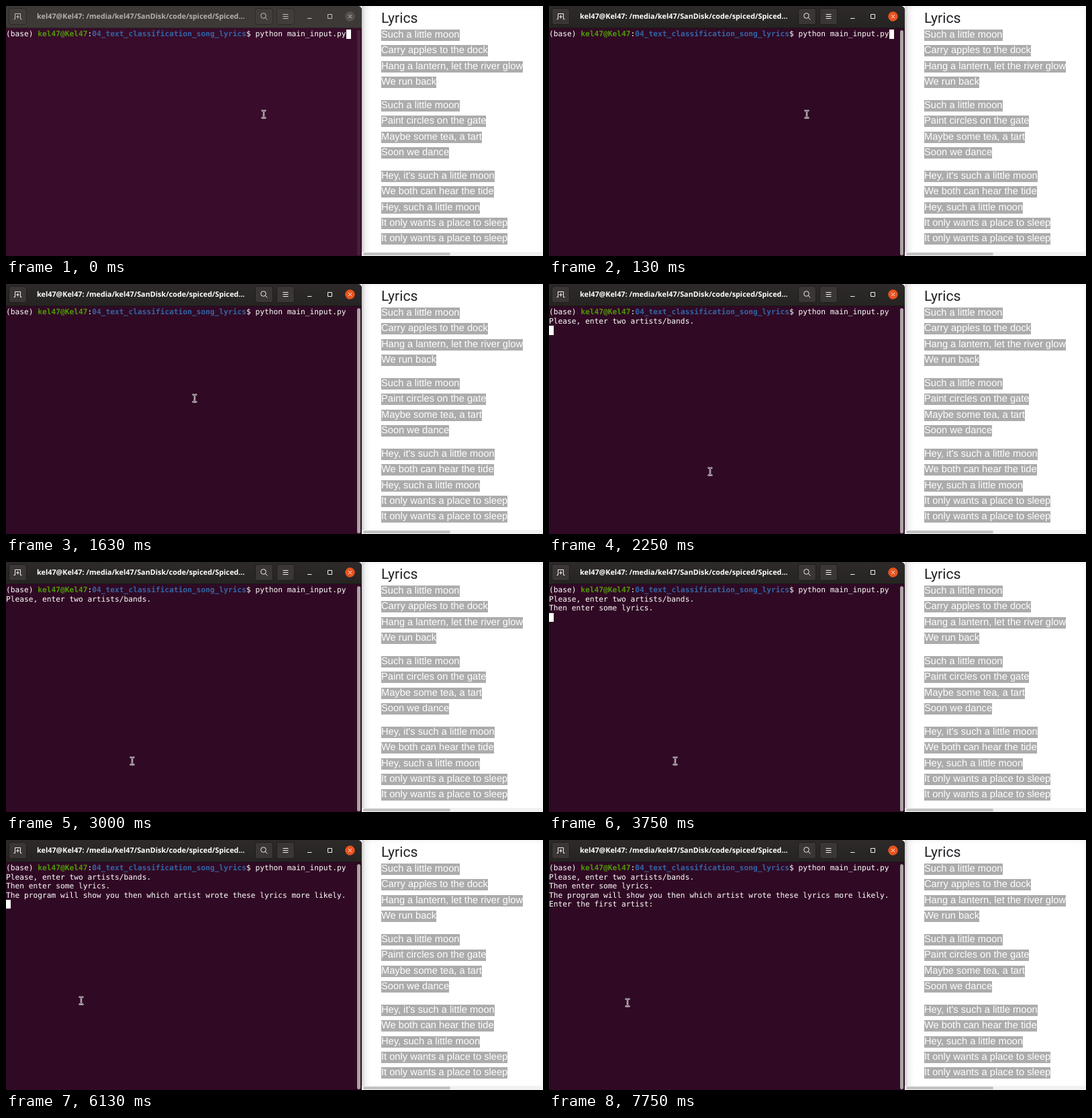
An HTML page for the animation above (8000 ms loop, 800 by 372 pixels).

```html
<!DOCTYPE html>
<html lang="en">
<head>
<meta charset="utf-8">
<title>Terminal and lyrics</title>
<style>
html, body { margin: 0; width: 100%; height: 100%; overflow: hidden; background: #fff; }
#stage { position: relative; width: 800px; height: 372px; overflow: hidden; text-rendering: geometricPrecision; }
#stage > *, .row { position: absolute; }
.row { white-space: pre; }

#page { left: 530px; top: 0; width: 270px; height: 372px; background: #fff; }
#page h1 { position: absolute; margin: 0; left: 29px; top: 6.6px; font: 400 21.2px/24px Roboto, sans-serif; color: #202124; }
#page .row { left: 29px; font: 14.66px/17px "Liberation Sans", Arial, sans-serif; color: #fff; background: #acacac; }
#shade { position: absolute; inset: 0; box-shadow: inset 0 0 8px rgba(0,0,0,.08);
  background: linear-gradient(90deg, rgba(0,0,0,.16), rgba(0,0,0,.05) 5px, transparent 14px); }
#track { position: absolute; left: 0; top: 366px; width: 270px; height: 6px; background: #f1f1f1; }
#track i { position: absolute; left: 2px; top: 1px; width: 130px; height: 4px; border-radius: 2px; background: #c1c1c1; }

#term { left: 0; top: 0; width: 530px; height: 372px; border-top-right-radius: 6px; overflow: hidden; background: #300a24; }
#term .row { left: 0; font: 11.22px/13.4px "DejaVu Sans Mono", monospace; color: #fff; }
#term b.user { color: #4e9a06; }
#term b.path { color: #3465a4; }
#bar { position: absolute; left: 0; top: 0; width: 530px; height: 33px; box-sizing: border-box;
  background: linear-gradient(#2d2a29, #262423); border-bottom: 1px solid #1a1817; }
#name { position: absolute; left: 46px; top: 7px; font: 700 10.83px/18px "Open Sans", "Noto Sans", sans-serif; color: #fff; white-space: pre; }
#thumb { position: absolute; left: 523px; top: 36px; width: 5px; height: 335px; border-radius: 2.5px; background: #aaa5a3; }
#block { position: absolute; width: 7px; height: 13.4px; background: #fff; }
svg { position: absolute; left: 0; top: 0; overflow: visible; }
.key { fill: #393635; stroke: #1f1c1b; }
.icon { fill: none; stroke: #f2f1f0; }
.disc { fill: #e95420; }

#term.idle { background: #380c2a; }
.idle #bar { background: #3c3937; border-color: #2c2928; }
.idle #name { color: #b3b0ad; }
.idle #thumb { background: #45203a; }
.idle .key { fill: #403d3b; stroke: #2d2a29; }
.idle .icon { stroke: #c4c1be; }
.idle .disc { fill: #56524f; }
</style>
</head>
<body>
<div id="stage">
  <div id="page">
    <div id="shade"></div>
    <h1>Lyrics</h1>
    <div id="track"><i></i></div>
  </div>
  <div id="term">
    <div id="bar">
      <div id="name">kel47@Kel47: /media/kel47/SanDisk/code/spiced/Spiced...</div>
      <svg width="530" height="33">
        <g class="key">
          <rect x="4.5" y="3.5" width="26" height="24" rx="3"/>
          <rect x="371.5" y="3.5" width="26" height="24" rx="3"/>
          <rect x="403.5" y="3.5" width="26" height="24" rx="3"/>
        </g>
        <circle class="disc" cx="512.5" cy="15.5" r="7.2"/>
        <g class="icon">
          <path d="M11.5 19.5H13.5V11.5H21.5V19.5H23.5M17.5 13.5V18.5M15 16H20"/>
          <circle cx="383.5" cy="14.5" r="3.8"/>
          <path d="M386.3 17.3L389.4 20.4M412.5 12.5H420.5M412.5 15.5H420.5M412.5 18.5H420.5"/>
          <path d="M449 18.5H455.5M479.5 12.5H485.5V18.5H479.5ZM510 13L515 18M515 13L510 18"/>
        </g>
      </svg>
    </div>
    <div id="thumb"></div>
    <div id="block"></div>
  </div>
  <svg id="mouse" width="1" height="1">
    <defs><path id="beam" d="M-2.4 -5.4Q0 -5.4 0 -4Q0 -5.4 2.4 -5.4M0 -4V4M-2.4 5.4Q0 5.4 0 4Q0 5.4 2.4 5.4"/></defs>
    <g fill="none" stroke-linecap="round">
      <use href="#beam" stroke="#fff" stroke-width="2.4"/>
      <use href="#beam" stroke="#3a2a35" stroke-width=".9"/>
    </g>
  </svg>
</div>
<script>
const LOOP = 8000, STEP = 125, FOCUS = 125, ENTER = 875;
const ROW = 13.4, TOP = 35.4, PROMPT_END = 506.5;
const $ = id => document.getElementById(id);

function addRow(parent, top, html) {
  const el = document.createElement('div');
  el.className = 'row';
  el.style.top = top + 'px';
  el.innerHTML = html;
  parent.appendChild(el);
  return el;
}

const verses = [
  ['Such a little moon', 'Carry apples to the dock', 'Hang a lantern, let the river glow', 'We run back'],
  ['Such a little moon', 'Paint circles on the gate', 'Maybe some tea, a tart', 'Soon we dance'],
  ["Hey, it's such a little moon", 'We both can hear the tide', 'Hey, such a little moon',
   'It only wants a place to sleep', 'It only wants a place to sleep']
];
let n = 0;
verses.forEach((verse, v) => verse.forEach(line => addRow($('page'), 35 + n++ * 23.25 + v * 12, line)));

addRow($('term'), TOP, '(base) <b class="user">kel47@Kel47</b>:<b class="path">04_text_classification_song_lyrics</b>$ python main_input.py');
const output = [
  { time: 2250, text: 'Please, enter two artists/bands.' },
  { time: 3750, text: 'Then enter some lyrics.' },
  { time: 5375, text: 'The program will show you then which artist wrote these lyrics more likely.' },
  { time: 7750, text: 'Enter the first artist:' }
];
output.forEach((line, i) => line.el = addRow($('term'), TOP + (i + 1) * ROW, line.text));

// Key points of the pointer: time, x, y
const path = [
  [0, 384, 160.5], [ENTER, 384, 160.5],
  [1250, 377, 148], [1375, 377, 148], [1625, 281, 169.5], [2000, 241, 298], [2250, 240, 279],
  [2375, 202, 298.5], [3000, 187.5, 296], [5375, 187.5, 296], [6125, 112, 238.5], [6375, 117, 242], [LOOP, 117, 242]
];

function pointer(t) {
  const i = path.findIndex(p => p[0] > t);
  const [t0, x0, y0] = path[i - 1], [t1, x1, y1] = path[i];
  const k = (t - t0) / (t1 - t0);
  return [x0 + (x1 - x0) * k, y0 + (y1 - y0) * k];
}

function draw(t) {
  $('term').classList.toggle('idle', t < FOCUS);
  for (const { time, el } of output) el.style.visibility = t >= time ? 'visible' : 'hidden';

  const typed = t < ENTER;
  const row = typed ? 0 : 1 + output.filter(line => t >= line.time).length;
  const lit = t < 625 || (t + 400) % 1200 < 600;
  $('block').style.cssText = `left:${typed ? PROMPT_END : 0}px;top:${TOP + row * ROW}px;opacity:${+lit}`;

  // The pointer hides on the key press until it moves again
  const [x, y] = pointer(t);
  const hidden = t >= ENTER && t < 1250;
  $('mouse').style.cssText = `left:${x}px;top:${y}px;opacity:${+!hidden}`;
}

const start = performance.now();
function tick() {
  const t = (performance.now() - start) % LOOP;
  draw(Math.floor(t / STEP) * STEP);
  requestAnimationFrame(tick);
}
draw(0);
requestAnimationFrame(tick);
</script>
</body>
</html>
```
